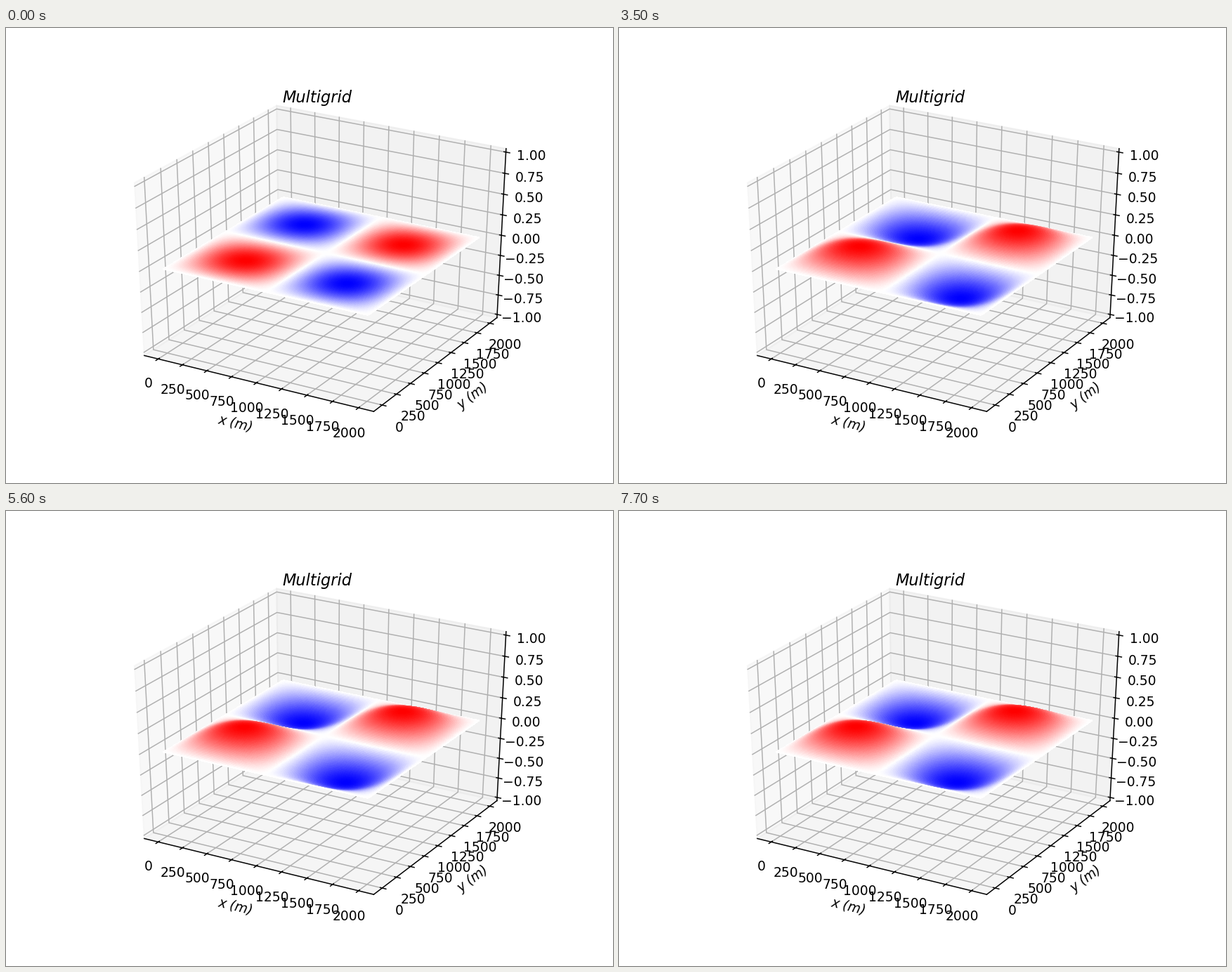
Recreate the animation shown at these times as a matplotlib script. Size 864 by 648 pixels, loop 8 s.

```python
import numpy as np
import matplotlib.pyplot as plt
from matplotlib.animation import FuncAnimation

W, H, DPI = 864, 648, 135
HOLD = 7          # animation ticks per solver step
N = 200           # grid points per side
H0 = 0.5 + 1 / 48  # half size of the padded unit cube
D = 1 / 12

# (amplitude, sideways drift in metres) of every solver step
STEPS = [(0.004, 25), (0.012, 35), (0.07, 48),
         (0.205, 38), (0.215, 36), (0.18, 42),
         (0.42, 32), (0.44, 30), (0.20, 8),
         (0.675, 24), (0.685, 22), (0.205, -10)]

elev, azim = np.radians(30), np.radians(-60)
VIEW = np.array([np.cos(elev) * np.cos(azim), np.cos(elev) * np.sin(azim), np.sin(elev)])
RIGHT = np.array([-np.sin(azim), np.cos(azim), 0])
UP = np.cross(VIEW, RIGHT)


def project(p):
    """Centred unit-cube points (..., 3) to pixels, y pointing down."""
    p = np.asarray(p, float)
    depth = 10 - p @ VIEW
    x = 0.125 * W + (p @ RIGHT / depth + 0.095) / 0.185 * 0.775 * W
    y = H - 0.11 * H - (p @ UP / depth + 0.095) / 0.185 * 0.77 * H
    return np.stack([x, y], -1)


def unit(metres):
    return (np.asarray(metres) + 100) / 2200 - 0.5


fig = plt.figure(figsize=(W / DPI, H / DPI), dpi=DPI, facecolor="white")
ax = fig.add_axes([0, 0, 1, 1])
ax.set_xlim(0, W)
ax.set_ylim(H, 0)
ax.axis("off")


def line(points, color, z):
    x, y = project(points).T
    ax.plot(x, y, color=color, lw=0.8, zorder=z, solid_capstyle="projecting")


def pane(points, shade):
    ax.add_patch(plt.Polygon(project(points), facecolor=str(shade), edgecolor=str(shade),
                             alpha=0.5, lw=1, zorder=0))


def label(p, s, **kw):
    x, y = project(p)
    ax.text(x, y, s, fontsize=10, ha="center", zorder=3, **kw)


def axis_label(p, a, b, s):
    dx, dy = project(b) - project(a)
    label(p, s, va="center", style="italic", rotation=np.degrees(np.arctan2(-dy, dx)),
          rotation_mode="anchor")


def draw_box():
    h = H0
    left, front, right = (-h, -h, -h), (h, -h, -h), (h, h, -h)
    back, top = (-h, h, -h), (-h, h, h)
    pane([left, back, top, (-h, -h, h)], 0.95)
    pane([back, right, (h, h, h), top], 0.90)
    pane([left, front, right, back], 0.925)

    out, inn = h + 0.2 * D, h - 0.1 * D
    per_point = 48 / (72 * (0.775 * W + 0.77 * H) / DPI)
    far = h + 11.5 * per_point * D
    grid = "#b0b0b0"
    for m in range(0, 2001, 250):
        t = unit(m)
        line([(t, -h, -h), (t, h, -h), (t, h, h)], grid, 1)
        line([(h, t, -h), (-h, t, -h), (-h, t, h)], grid, 1)
        line([(t, -out, -h), (t, -inn, -h)], "k", 2)
        line([(out, t, -h), (inn, t, -h)], "k", 2)
        label((t, -far, -far), str(m), va="top")
        label((far, t, -far), str(m), va="top")
    for v in np.linspace(-1, 1, 9):
        t = v / 2
        line([(-h, -h, t), (-h, h, t), (h, h, t)], grid, 1)
        line([(out, h, t), (inn, h, t)], "k", 2)
        label((far, far, t), f"{v:.2f}".replace("-", "\u2212"), va="top")

    line([left, front], "k", 2)
    line([front, right], "k", 2)
    line([right, (h, h, h)], "k", 2)

    away = h + 25 * per_point * D
    axis_label((0, -away, -away), left, front, "x (m)")
    axis_label((away, 0, -away), front, right, "y (m)")
    ax.text(0.5125 * W, H * (1 - 0.11 - 0.92 * 0.77) - 6 * DPI / 72, "Multigrid",
            fontsize=12, style="italic", ha="center", va="baseline", zorder=3)


def surface(amp, drift):
    """Point cloud of two-pixel squares, painted from back to front."""
    m = np.linspace(0, 2000, N)
    x, y = (g.ravel() for g in np.meshgrid(m, m))
    warped = x - drift * np.sin(np.pi * x / 2000)
    z = amp * np.sin(np.pi * warped / 1000) * np.sin(np.pi * y / 1000)
    p = np.stack([unit(x), unit(y), z / 2], -1)
    order = np.argsort(p @ VIEW)
    p, z = p[order], z[order]

    colors = plt.get_cmap("bwr")((z - z.min()) / np.ptp(z), bytes=True)
    corner = np.rint(project(p) - 1).astype(int)
    cols = corner[:, :1] + [0, 1, 0, 1]
    rows = corner[:, 1:] + [0, 0, 1, 1]
    img = np.zeros((H, W, 4), np.uint8)
    img[rows.ravel(), cols.ravel()] = np.repeat(colors, 4, axis=0)
    return img


draw_box()
clouds = [surface(*s) for s in STEPS]
cloud = ax.imshow(clouds[0], extent=(0, W, H, 0), aspect="auto",
                  interpolation="nearest", zorder=5)


def update(i):
    cloud.set_data(clouds[i // HOLD])
    return [cloud]


anim = FuncAnimation(fig, update, frames=80, interval=100, repeat=True, repeat_delay=0)
plt.show()
```
